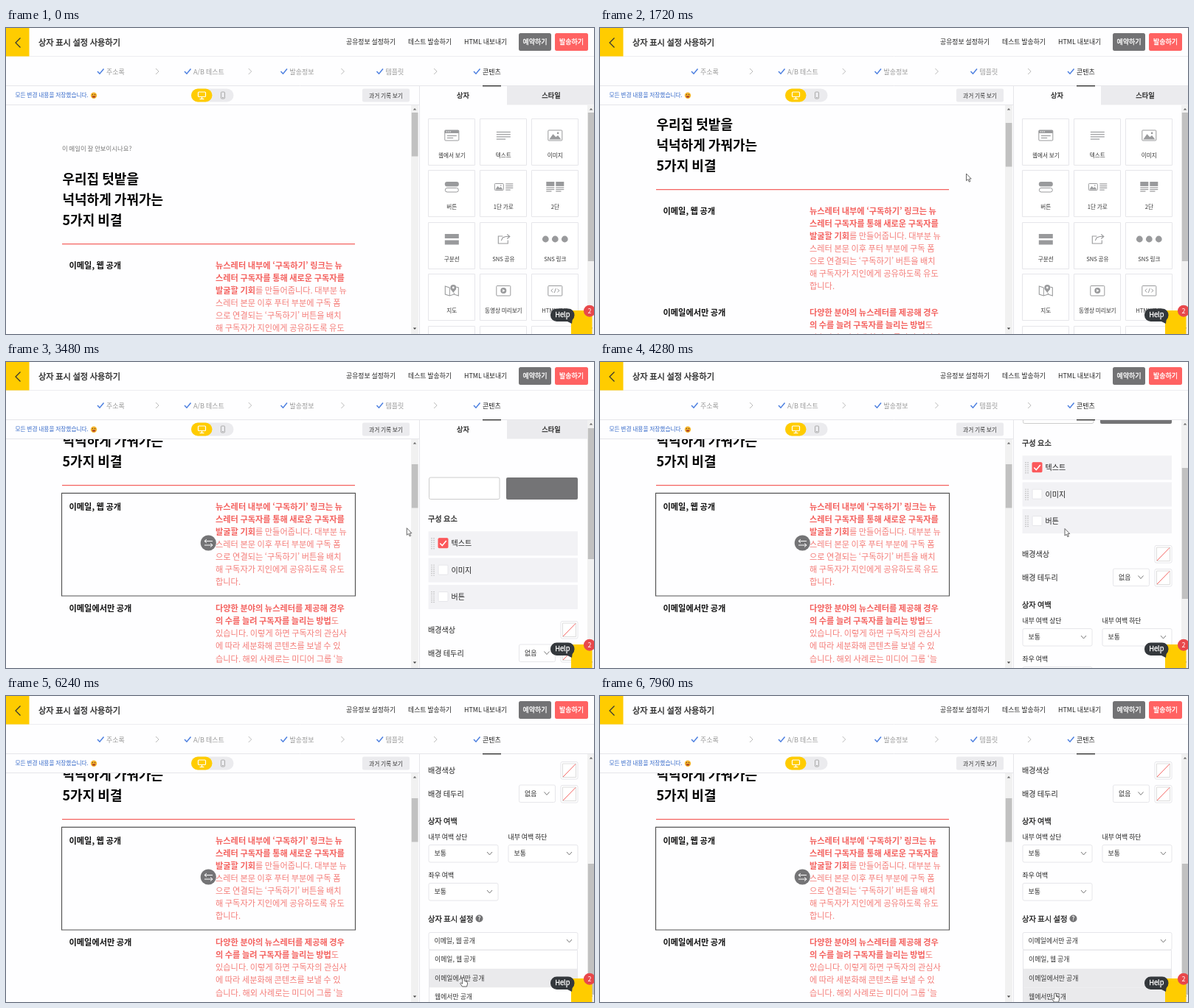
These frames come from a looping animation (797x416 px, 8 s). An HTML page with a canvas:

```html
<!DOCTYPE html>
<html lang="ko">
<head>
<meta charset="utf-8">
<title>상자 표시 설정</title>
<style>
html, body { margin: 0; width: 100%; height: 100%; overflow: hidden; background: #fff; }
canvas { display: block; width: 797px; height: 416px; }
</style>
</head>
<body>
<canvas id="stage"></canvas>
<script>
const W = 797, H = 416, LOOP = 8000;
const FONT = '"Noto Sans CJK KR", "Noto Sans KR", "Noto Sans CJK", "Open Sans", sans-serif';
const RED = '#f4625f', SOFT_RED = '#f47d79', GRAY = '#999a9c', INK = '#222', EDGE = '#e6e6ea', YELLOW = '#ffcc00';
const canvas = document.getElementById('stage');
const ctx = canvas.getContext('2d');
const dpr = window.devicePixelRatio || 1;
canvas.width = W * dpr;
canvas.height = H * dpr;

// ---- drawing helpers ----
function text(str, x, y, size, color = INK, weight = 400, align = 'left') {
  ctx.font = `${weight} ${size}px ${FONT}`;
  ctx.fillStyle = color;
  ctx.textAlign = align;
  ctx.fillText(str, x, y + size * 0.37);
  if (weight === 500) { // thicken, as no medium cut is at hand
    ctx.strokeStyle = color;
    ctx.lineWidth = 0.3;
    ctx.strokeText(str, x, y + size * 0.37);
  }
}
const textWidth = (str, size, weight) => {
  ctx.font = `${weight} ${size}px ${FONT}`;
  return ctx.measureText(str).width;
};
function box(x, y, w, h, fill, stroke, r = 0, lw = 1) {
  ctx.beginPath();
  ctx.roundRect(x, y, w, h, r);
  if (fill) { ctx.fillStyle = fill; ctx.fill(); }
  if (stroke) { ctx.strokeStyle = stroke; ctx.lineWidth = lw; ctx.stroke(); }
}
function dot(x, y, r, fill) {
  ctx.beginPath();
  ctx.arc(x, y, r, 0, Math.PI * 2);
  ctx.fillStyle = fill;
  ctx.fill();
}
function trace(pts) {
  ctx.beginPath();
  for (let i = 0; i < pts.length; i += 2) ctx.lineTo(pts[i], pts[i + 1]);
}
function line(color, width, ...pts) {
  trace(pts);
  ctx.strokeStyle = color;
  ctx.lineWidth = width;
  ctx.stroke();
}
function poly(fill, ...pts) {
  trace(pts);
  ctx.fillStyle = fill;
  ctx.fill();
}
function clipped(x, y, w, h, draw) {
  ctx.save();
  ctx.beginPath();
  ctx.rect(x, y, w, h);
  ctx.clip();
  draw();
  ctx.restore();
}
function shifted(x, y, draw) {
  ctx.save();
  ctx.translate(x, y);
  draw();
  ctx.restore();
}
const check = (x, y, color, w = 1.5) => line(color, w, x, y, x + 3, y + 3.2, x + 8.5, y - 3.5);
const down = (x, y) => line('#777', 1, x - 3.5, y - 2, x, y + 2, x + 3.5, y - 2);

// Eased value between keys of the form [time, a, b, ...]
function at(keys, t) {
  if (t <= keys[0][0]) return keys[0].slice(1);
  for (let i = 1; i < keys.length; i++) {
    const p = keys[i - 1], q = keys[i];
    if (t < q[0]) {
      let u = (t - p[0]) / (q[0] - p[0]);
      u = u * u * (3 - 2 * u);
      return p.slice(1).map((v, k) => v + (q[k + 1] - v) * u);
    }
  }
  return keys[keys.length - 1].slice(1);
}

// ---- timeline ----
const MAIL_SCROLL = [[1360, 0], [1440, 15], [1980, 126]];
const SIDE_SCROLL = [[3720, 0], [4040, 103], [4480, 103], [4900, 263]];
const POINTER = [
  [300, 800, 150], [1080, 496.5, 198], [2200, 496.5, 198], [2560, 467, 225],
  [3280, 467, 225], [3700, 630, 226.5], [4900, 630, 226.5], [5280, 621, 329],
  [5720, 621, 329], [6080, 620, 383], [6600, 620, 383], [6920, 620, 333],
  [7360, 620, 333], [7920, 617, 404]
];
const HOVER = 2480, SELECT = 3240, OPEN = 5560, PICK = 6480, REOPEN = 7160;

// ---- mail preview ----
function paragraph(lines, x, y) {
  lines.forEach(([bold, plain], i) => {
    const ly = y + i * 17.1;
    if (bold) text(bold, x, ly, 11.2, RED, 700);
    if (plain) text(plain, x + (bold ? textWidth(bold, 11.2, 700) : 0), ly, 11.2, SOFT_RED, 300);
  });
}
const OPEN_TEXT = [
  ['뉴스레터 내부에 ‘구독하기’ 링크는 뉴'], ['스레터 구독자를 통해 새로운 구독자를'],
  ['발굴할 기회', '를 만들어줍니다. 대부분 뉴'], ['', '스레터 본문 이후 푸터 부분에 구독 폼'],
  ['', '으로 연결되는 ‘구독하기’ 버튼을 배치'], ['', '해 구독자가 지인에게 공유하도록 유도'], ['', '합니다.']
];
const MAIL_TEXT = [
  ['다양한 분야의 뉴스레터를 제공해 경우'], ['의 수를 늘려 구독자를 늘리는 방법', '도'],
  ['', '있습니다. 이렇게 하면 구독자의 관심사'], ['', '에 따라 세분화해 콘텐츠를 보낼 수 있'],
  ['', '습니다. 해외 사례로는 미디어 그룹 ‘늘']
];

function boxHandles() {
  const key = (x, y) => box(x, y, 19, 19, '#58585a', null, 2);
  key(54, 305); key(54, 327); key(54, 349);
  for (let i = 0; i < 6; i++) dot(62 + i % 2 * 3.4, 311 + (i >> 1) * 3.6, 1, '#fff');
  line('#fff', 1.4, 59, 339, 63.5, 334, 68, 339);
  line('#fff', 1.4, 59, 356, 63.5, 361, 68, 356);
  key(476, 304.5); key(476, 326.5);
  box(482, 311, 7, 8.5, null, '#fff', 1);
  line('#fff', 1, 480.5, 310.5, 490.5, 310.5);
  line('#fff', 1, 483.5, 309, 487.5, 309);
  line('#fff', 0.8, 484.5, 313, 484.5, 318);
  line('#fff', 0.8, 486.5, 313, 486.5, 318);
  line('#fff', 1, 488, 331, 481.5, 331, 481.5, 339);
  box(484, 333, 6, 8, null, '#fff', 1);
  line('#fff', 1, 485, 337, 489, 337);
  line('#fff', 1, 487, 335, 487, 339);
}

function mail(t, scroll) {
  clipped(0, 105, 549, 311, () => shifted(0, -scroll, () => {
    text('이 메일이 잘 안보이시나요?', 76, 164, 8.4, '#777');
    ['우리집 텃밭을', '넉넉하게 가꿔가는', '5가지 비결'].forEach((s, i) =>
      text(s, 76.5, 205 + i * 28, 18, '#000', 700));
    line(RED, 1.3, 76, 293.6, 473, 293.6);
    text('이메일, 웹 공개', 85.5, 322.5, 11.2, '#111', 700);
    paragraph(OPEN_TEXT, 284, 322.5);
    text('이메일에서만 공개', 85.5, 461, 11.2, '#111', 700);
    paragraph(MAIL_TEXT, 284, 461);
    if (t >= HOVER) box(75.5, 304.3, 398, 139.7, null, '#555', 0, 1.2);
    if (t >= HOVER && t < SELECT) boxHandles();
    if (t >= SELECT) {
      dot(274.3, 372, 10.6, '#747476');
      line('#fff', 1, 269, 369.5, 280, 369.5);
      line('#fff', 1, 272, 367, 269, 369.5, 272, 372);
      line('#fff', 1, 269, 375, 280, 375);
      line('#fff', 1, 277, 372.5, 280, 375, 277, 377.5);
    }
  }));
  scrollbar(549, 105, 115 + scroll * 0.19, 59.5);
}

function scrollbar(x, top, thumb, size) {
  box(x, top, 10, H - top, '#f1f1f1');
  poly('#666', x + 2.8, top + 6.5, x + 5, top + 4, x + 7.2, top + 6.5);
  poly('#444', x + 2.8, 407.5, x + 5, 410, x + 7.2, 407.5);
  box(x + 0.8, thumb, 8.6, size, '#c1c1c1');
}

// ---- box palette ----
function rows(x, y, w, n, gap = 3) {
  for (let i = 0; i < n; i++) line(GRAY, 1.2, x, y + i * gap, x + (i === n - 1 ? w * 0.65 : w), y + i * gap);
}
function picture(w, h) {
  box(-w / 2, -h / 2, w, h, null, GRAY, 1);
  poly(GRAY, -w * 0.42, h * 0.4, -w * 0.15, -h * 0.12, w * 0.05, h * 0.16, w * 0.2, 0, w * 0.43, h * 0.4);
  dot(w * 0.2, -h * 0.22, w * 0.07, GRAY);
}
const ICONS = [
  ['웹에서 보기', () => {
    box(-9.5, -7, 19, 14, null, GRAY, 1);
    box(-9.5, -7, 19, 4, GRAY);
    rows(-6.5, 0.5, 13, 2);
    for (let i = 0; i < 3; i++) dot(-7 + i * 2.4, -5, 0.7, '#fff');
  }],
  ['텍스트', () => rows(-9.5, -4.5, 19, 4, 3.2)],
  ['이미지', () => picture(19, 14)],
  ['버튼', () => {
    box(-9.5, -7, 19, 6.5, GRAY, null, 3);
    box(-9, 1.5, 18, 5.5, null, GRAY, 2.7);
  }],
  ['1단 가로', () => {
    shifted(-6, 0, () => picture(12, 9));
    rows(3, -4, 10, 4, 2.7);
  }],
  ['2단', () => [-12, 1].forEach(x => {
    box(x, -7, 11, 6, GRAY);
    rows(x, 1, 11, 3, 2.5);
  })],
  ['구분선', () => {
    box(-9.5, -7, 19, 6, GRAY);
    box(-9.5, 1.5, 19, 6, GRAY);
  }],
  ['SNS 공유', () => {
    line(GRAY, 1.1, -1, -4, -7, -4, -7, 6, 6, 6, 6, 1.5);
    line(GRAY, 1.1, -3, 2, -1, -2, 3, -3.5, 8, -3.5);
    line(GRAY, 1.1, 5, -6.5, 8.5, -3.5, 5, -0.5);
  }],
  ['SNS 링크', () => [-13, 0, 13].forEach(x => dot(x, 0, 4.4, GRAY))],
  ['지도', () => {
    line(GRAY, 1.1, -3, -4, -9, -6, -9, 5, -3, 7, 3, 5, 9, 7, 9, -4, 6, -5);
    line(GRAY, 1, -3, -4, -3, 7);
    line(GRAY, 1, 3, 3, 3, 5);
    poly(GRAY, -1.7, -2, 2, 3, 5.5, -2);
    dot(2, -4, 4, GRAY);
    dot(2, -4, 1.4, '#fff');
  }],
  ['동영상 미리보기', () => {
    box(-9.5, -6.5, 19, 13.5, null, GRAY, 1);
    dot(0, 0, 4, GRAY);
    poly('#fff', -1.2, -2, 2.2, 0, -1.2, 2);
  }],
  ['HTML 코드', () => {
    box(-9.5, -6.5, 19, 13.5, null, GRAY, 1);
    line(GRAY, 1, -3, -2.5, -5.5, 0, -3, 2.5);
    line(GRAY, 1, 3, -2.5, 5.5, 0, 3, 2.5);
    line(GRAY, 1, 1, -3, -1, 3);
  }]
];

function tabs() {
  box(679, 79, 118, 25.5, '#ebebee');
  text('상자', 619.5, 92, 9.2, INK, 500, 'center');
  text('스타일', 739, 92, 9.2, INK, 500, 'center');
}
function palette() {
  tabs();
  for (let i = 0; i < 15; i++) {
    const x = 572.5 + i % 3 * 70, y = Math.round(124 + Math.floor(i / 3) * 70.4) - 0.5;
    box(x, y, 63, 63, '#fff', EDGE);
    if (!ICONS[i]) continue;
    shifted(x + 31.8, y + 22.5, ICONS[i][1]);
    text(ICONS[i][0], x + 31.8, y + 49.5, 7.6, '#333', 400, 'center');
  }
  scrollbar(788, 105, 115, 202);
}

// ---- box settings ----
function select(label, x, y, w) {
  box(x + 0.5, y + 0.5, w - 1, 23.5, '#fff', EDGE, 2);
  text(label, x + 8, y + 12, 8.9, '#333');
  down(x + w - 12, y + 12);
}
function swatch(y) {
  box(752, y, 23, 23.5, '#fff', EDGE, 2);
  box(754.5, y + 2.5, 18, 18.5, null, '#ddd');
  line(RED, 1, 755, y + 20.5, 772, y + 3);
}
const OPTIONS = ['이메일, 웹 공개', '이메일에서만 공개', '웹에서만 공개'];

function menu(choice, pointerY, scroll) {
  box(573.5, 505.5, 201, 77, '#fff', EDGE);
  OPTIONS.forEach((s, i) => {
    const y = 505.3 + i * 25.5, py = pointerY - 103 + scroll;
    if ((py >= y && py < y + 25.5) || (choice && i === choice))
      box(574, y, 200, 25.5, '#eaeaec');
    text(s, 581, y + 12.7, 8.9, '#333');
  });
}

function settings(t, scroll, pointerY) {
  clipped(561, 79, 227, 337, () => shifted(0, 103 - scroll, () => {
    shifted(0, -103, tabs);
    box(573.5, 54, 95.5, 29.5, '#fff', '#ccc', 2);
    box(678, 54, 97, 30, '#747476', null, 2);
    text('구성 요소', 572, 110, 10.2, INK, 500);
    ['텍스트', '이미지', '버튼'].forEach((s, i) => {
      const y = 143.7 + i * 36.4;
      box(572.5, y - 16.5, 202.5, 33, '#f2f2f5');
      for (let k = 0; k < 12; k++) dot(577 + k % 2 * 3, y - 7 + (k >> 1) * 2.8, 0.7, '#aaa');
      box(586, y - 7, 13, 13, i ? '#fff' : '#fb585b', i ? EDGE : '#fb585b', 1);
      if (!i) check(588.3, y - 0.3, '#fff', 1.5);
      text(s, 603.5, y, 10, INK);
    });
    text('배경색상', 572, 261, 10.1);
    swatch(249.5);
    text('배경 테두리', 572, 293, 10.1);
    select('없음', 695, 280.5, 50);
    swatch(281.5);
    text('상자 여백', 572, 330, 10.2, INK, 500);
    text('내부 여백 상단', 572.5, 351.5, 8.9);
    text('내부 여백 하단', 680.5, 351.5, 8.9);
    select('보통', 572.5, 362, 95);
    select('보통', 680.5, 362, 95);
    text('좌우 여백', 572.5, 403.3, 8.9);
    select('보통', 572.5, 414, 95);
    text('상자 표시 설정', 572, 463, 10.3, INK, 500);
    dot(641.5, 462.5, 5, '#747476');
    text('?', 641.5, 462.5, 7.5, '#fff', 500, 'center');
    const choice = t < PICK ? 0 : 1;
    select(OPTIONS[choice], 572.5, 481, 203);
    if ((t >= OPEN && t < PICK) || t >= REOPEN) menu(choice, pointerY, scroll);
  }));
  scrollbar(788, 79, 90 + scroll * 0.525, 178);
}

// ---- fixed chrome ----
function header() {
  line('#ededf0', 1, 0, 38.5, W, 38.5);
  box(0, 0, 31.5, 38.5, YELLOW);
  line('#333', 1.2, 19.5, 13.5, 13, 20, 19.5, 26.5);
  text('상자 표시 설정 사용하기', 44, 20, 11.25, INK, 500);
  text('공유정보 설정하기', 461, 19, 8.85);
  text('테스트 발송하기', 545, 19, 8.85);
  text('HTML 내보내기', 621, 19, 8.85);
  box(695, 7, 44, 24, '#727274', null, 2.5);
  box(744, 7, 45, 24, '#ff6262', null, 2.5);
  text('예약하기', 717, 19, 9, '#fff', 500, 'center');
  text('발송하기', 766.5, 19, 9, '#fff', 500, 'center');

  [['주소록', 136], ['A/B 테스트', 254], ['발송정보', 384.5], ['템플릿', 514.5], ['콘텐츠', 646]].forEach(([s, x], i) => {
    check(x - 12, 59, '#4c7fe0');
    text(s, x, 59.5, 9, i === 4 ? INK : '#999');
    if (i < 4) {
      const cx = 203 + i * 125.7;
      line('#bbb', 1, cx, 55, cx + 4, 59, cx, 63);
    }
  });
  line(EDGE, 1, 0, 78.5, W, 78.5);
  box(646, 78, 25, 1.4, '#333');
}

function toolbar() {
  text('모든 변경 내용을 저장했습니다.', 12.5, 91.5, 7.7, '#3569c9');
  dot(119, 91.8, 4.2, '#f5b52e');
  dot(117.5, 90.5, 0.7, '#5a3413');
  dot(120.5, 90.5, 0.7, '#5a3413');
  poly('#a33022', 116.5, 92.5, 121.5, 92.5, 120.5, 94.5, 117.5, 94.5);
  box(251, 82.5, 57.5, 18, '#ebebee', null, 9);
  box(251, 82.5, 28.5, 18, YELLOW, null, 9);
  box(260.5, 87, 10, 6.5, null, '#fff', 1, 1.2);
  line('#fff', 1.2, 265.5, 94, 265.5, 96.5);
  line('#fff', 1.2, 262.5, 96.5, 268.5, 96.5);
  box(291.5, 87, 5, 9, null, '#aaa', 1);
  line('#aaa', 1, 293, 94.5, 295, 94.5);
  box(483, 82.5, 64, 18, '#ebebee', null, 2);
  text('과거 기록 보기', 515, 91.7, 7.7, '#333', 400, 'center');
  line(EDGE, 1, 0, 104.5, 560, 104.5);
}

function helper() {
  box(766, 384, 28.5, 32, YELLOW);
  box(738, 381.5, 32.5, 17.5, '#34383c', null, 8.5);
  poly('#34383c', 757, 397, 768, 394, 767, 402);
  text('Help', 754.3, 390, 9.3, '#fff', 500, 'center');
  dot(791, 384.7, 8, '#e8484b');
  text('2', 791, 384.7, 9, '#fff', 400, 'center');
}

const ARROW = [0, 0, 0, 9.6, 2.2, 7.7, 3.9, 11.2, 5.4, 10.5, 3.8, 7.2, 6.7, 7];
const HAND = [0, 0, 1.4, 0.6, 1.4, 4.5, 5, 5.5, 5.6, 8, 4.6, 12, -1.6, 12, -4.5, 7.6, -3.6, 6.8, -1.3, 8.2, -1.3, 0.6];
const pointer = (x, y, shape) => shifted(x, y, () => {
  ctx.lineJoin = 'round';
  trace(shape);
  ctx.closePath();
  ctx.fillStyle = '#fff';
  ctx.strokeStyle = '#555';
  ctx.lineWidth = 0.9;
  ctx.fill();
  ctx.stroke();
});

function draw(t) {
  ctx.setTransform(dpr, 0, 0, dpr, 0, 0);
  ctx.fillStyle = '#fefeff';
  ctx.fillRect(0, 0, W, H);
  const [px, py] = at(POINTER, t);
  mail(t, at(MAIL_SCROLL, t)[0]);
  line(EDGE, 1, 560.5, 79, 560.5, H);
  if (t < SELECT) palette();
  else settings(t, at(SIDE_SCROLL, t)[0], py);
  header();
  toolbar();
  helper();
  if (t > 300) pointer(px, py, t > 5120 ? HAND : ARROW);
}

function frame(now) {
  draw(now % LOOP);
  requestAnimationFrame(frame);
}
draw(0);
requestAnimationFrame(frame);
</script>
</body>
</html>
```
